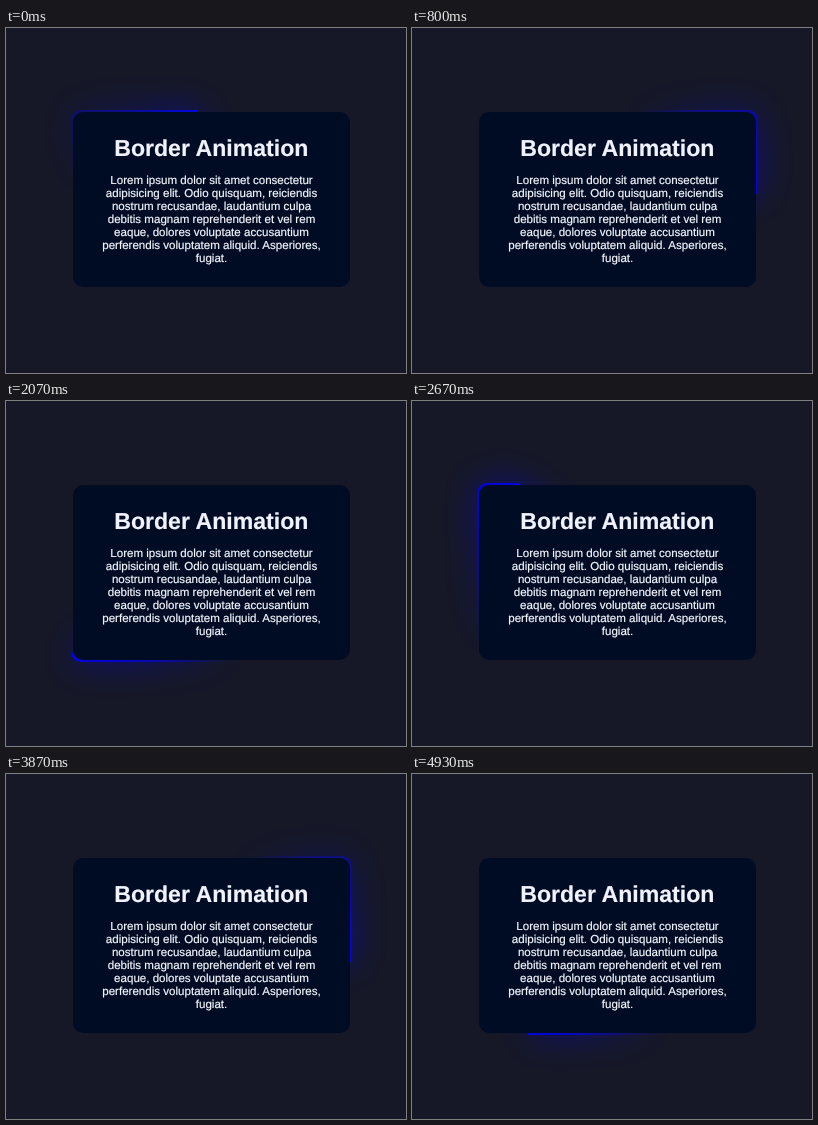
Write an HTML page that moves like this. It is 400 by 345 pixels and loops after 5000 ms.

```html
<!DOCTYPE html>
<html lang="en">
<head>
<meta charset="utf-8">
<title>Border Animation</title>
<style>
  html, body { margin: 0; width: 100%; height: 100%; overflow: hidden; background: #161827; }
  .stage { position: relative; width: 400px; height: 345px; overflow: hidden; }
  .stage > * { position: absolute; }
  .ring, .card { border-radius: 10px; }
  .ring {
    left: 65px; top: 82px; width: 281px; height: 179px; opacity: .85;
    background: conic-gradient(from var(--angle, 351.2deg), transparent 80%, blue);
  }
  .glow { filter: blur(17.4px); opacity: .45; }
  .card { left: 67px; top: 84px; width: 277px; height: 175px; background: #000b24; }
  svg { left: 0; top: 0; }
  text {
    font: 11.57px "Liberation Sans", Arial, sans-serif;
    text-anchor: middle; text-rendering: geometricPrecision;
    fill: #f5f7ff; stroke: #f5f7ff; stroke-width: .2px;
  }
  .title { font-size: 23.1px; font-weight: bold; fill: #f0f2ff; }
</style>
</head>
<body>
<div class="stage">
  <div class="ring glow"></div>
  <div class="ring"></div>
  <div class="card"></div>
  <svg width="400" height="345">
    <text class="title" x="205.3" y="128.4">Border Animation</text>
    <text x="205.5" y="156">Lorem ipsum dolor sit amet consectetur</text>
    <text x="205.5" y="169">adipisicing elit. Odio quisquam, reiciendis</text>
    <text x="205.5" y="182">nostrum recusandae, laudantium culpa</text>
    <text x="205.5" y="195">debitis magnam reprehenderit et vel rem</text>
    <text x="205.5" y="208">eaque, dolores voluptate accusantium</text>
    <text x="205.5" y="221">perferendis voluptatem aliquid. Asperiores,</text>
    <text x="205.5" y="234">fugiat.</text>
  </svg>
</div>
<script>
  const LOOP = 5000, STEP = 1000 / 15, START = 351.2, TURN = 8.03;
  const stage = document.querySelector('.stage');
  const begin = performance.now();

  function draw() {
    const time = (performance.now() - begin) % LOOP;
    // Steps land on rounded 10 ms marks, so some come slightly early.
    const step = Math.min(74, Math.floor((time + 3.5) / STEP));
    stage.style.setProperty('--angle', START + step * TURN + 'deg');
    requestAnimationFrame(draw);
  }
  draw();
</script>
</body>
</html>
```
